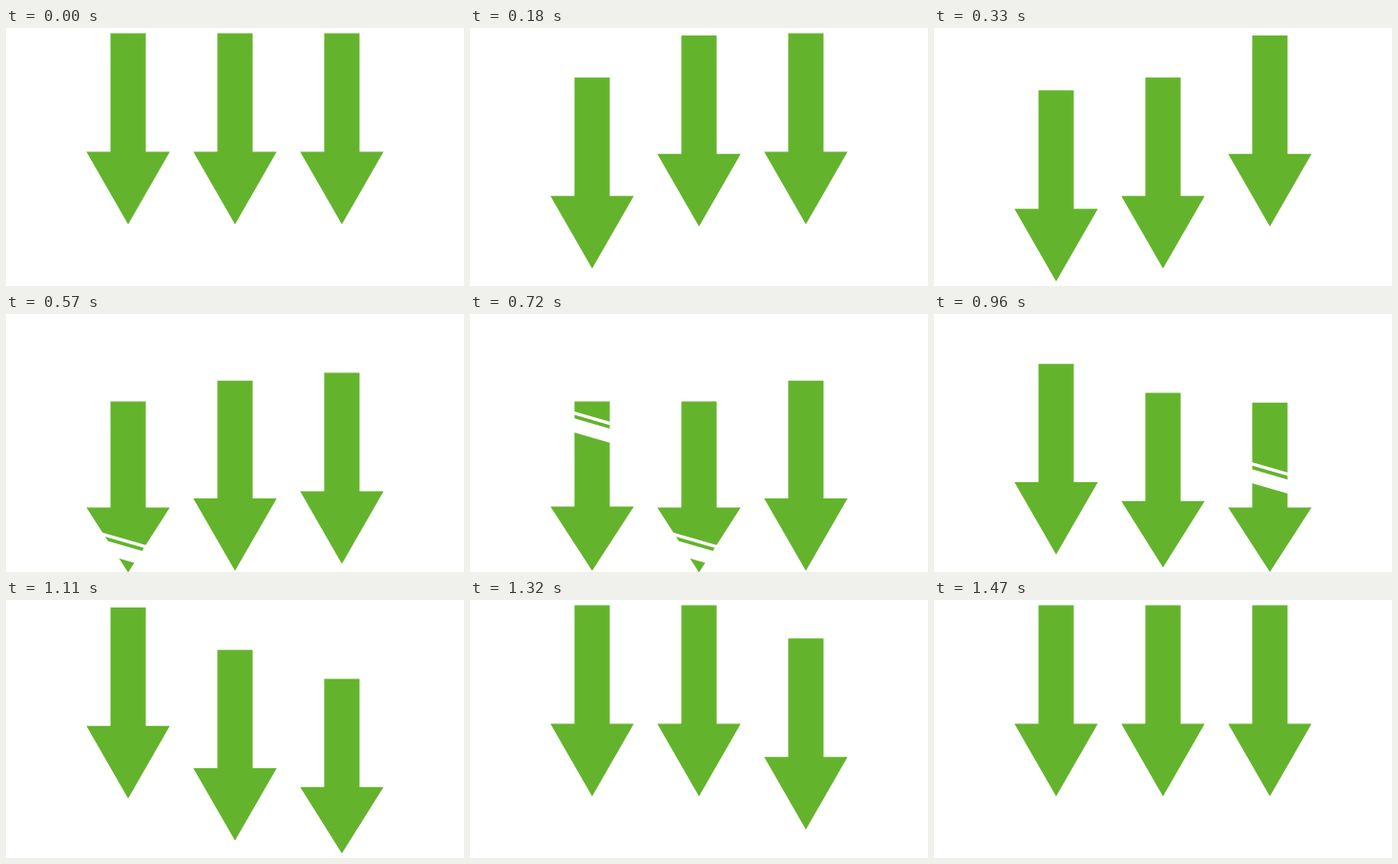
An HTML page with a canvas for the animation above (1500 ms loop, 480x270 px).

```html
<!DOCTYPE html>
<html lang="en">
<head>
<meta charset="utf-8">
<title>Bouncing arrows</title>
<style>
  html, body { margin: 0; width: 100%; height: 100%; overflow: hidden; background: #fff; }
  canvas { display: block; }
</style>
</head>
<body>
<canvas id="stage" width="480" height="270"></canvas>
<script>
const ctx = document.getElementById('stage').getContext('2d');
const LOOP = 1500, STEP = 30, STAGGER = 150;
const FALL = 570, DROP = 65, TIP = 205.5;
const HEAD = 76, LENGTH = 200;
const CENTERS = [128, 240, 352];

const clamp = v => Math.min(1, Math.max(0, v));
const smooth = (v, start, duration) => {
  const s = clamp((v - start) / duration);
  return s * s * (3 - 2 * s);
};

// Cubic bezier (0.19, 0, 0, 1), solved by bisection.
function fallEase(x) {
  let low = 0, high = 1;
  for (let i = 0; i < 24; i++) {
    const s = (low + high) / 2;
    if (0.57 * s * (1 - s) ** 2 + s ** 3 < x) low = s; else high = s;
  }
  return low * low * (3 - 2 * low);
}

function drawArrow(cx, tip, scale) {
  const neck = tip - HEAD * scale;
  const top = tip - LENGTH * scale;
  ctx.fillStyle = '#64b32d';
  ctx.beginPath();
  ctx.moveTo(cx - 18.5, top);
  ctx.lineTo(cx + 18.5, top);
  ctx.lineTo(cx + 18.5, neck);
  ctx.lineTo(cx + 43.7, neck);
  ctx.lineTo(cx, tip);
  ctx.lineTo(cx - 43.7, neck);
  ctx.lineTo(cx - 18.5, neck);
  ctx.fill();
}

function drawStripe(cx, y, height) {
  const half = 46, rise = half * 0.29;
  ctx.fillStyle = '#fff';
  ctx.beginPath();
  ctx.moveTo(cx - half, y - rise);
  ctx.lineTo(cx + half, y + rise);
  ctx.lineTo(cx + half, y + rise + height);
  ctx.lineTo(cx - half, y - rise + height);
  ctx.fill();
}

function draw(time) {
  ctx.fillStyle = '#fff';
  ctx.fillRect(0, 0, 480, 270);
  CENTERS.forEach((cx, i) => {
    const t = time - i * STAGGER;
    const tip = TIP + DROP * fallEase(clamp(1 - Math.abs(t - FALL) / FALL));
    const squash = smooth(t, 394, 212) - smooth(t, 727, 255);
    drawArrow(cx, tip, 1 - 0.114 * squash);
    if (t > 480 && t < 840) {
      const y = 271 - 221 * smooth(t, 480, 360);
      drawStripe(cx, y, 3.5);
      drawStripe(cx, y + 7.3, 14.7);
    }
  });
}

const start = performance.now();
function tick() {
  const time = (performance.now() - start) % LOOP;
  draw(Math.floor(time / STEP) * STEP);
  requestAnimationFrame(tick);
}
tick();
</script>
</body>
</html>
```
